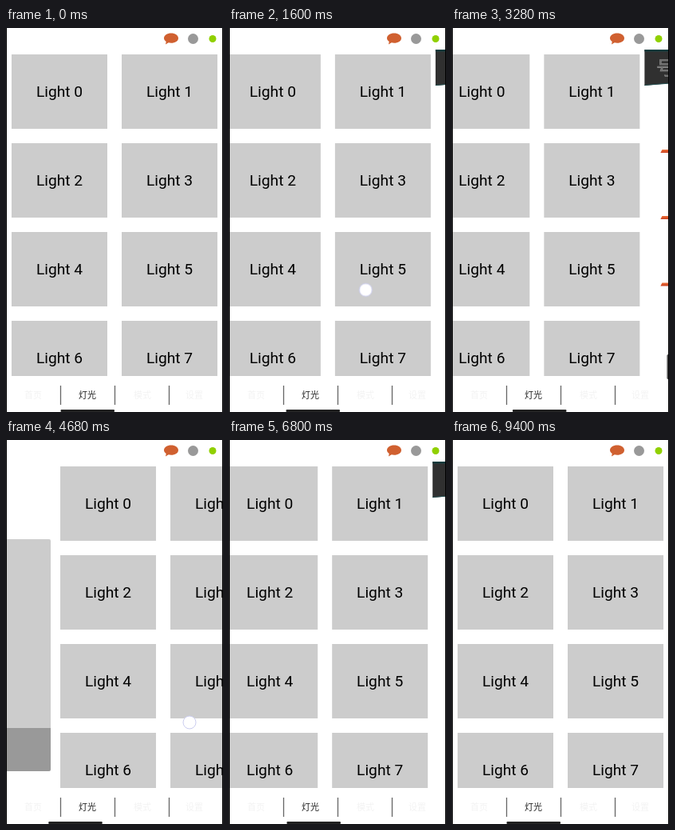
An HTML page for the animation above (9920 ms loop, 272 by 480 pixels).

```html
<!DOCTYPE html>
<html lang="zh-CN">
<head>
<meta charset="utf-8">
<title>灯光</title>
<style>
@property --x { syntax: "<number>"; inherits: true; initial-value: 0; }
@property --base { syntax: "<number>"; inherits: true; initial-value: 181; }
@property --y { syntax: "<number>"; inherits: true; initial-value: 324; }

html, body { margin: 0; width: 100%; height: 100%; overflow: hidden; background: #fff; }
svg {
  display: block; width: 272px; height: 480px;
  animation: drag 9920ms infinite, hand 9920ms linear infinite;
}
#pages { transform: translateX(calc(var(--x) * 1px)); }
#bar { transform: translateX(calc(var(--x) * -.25px)); }
#touch {
  fill: #fff; stroke: #c9cbee; stroke-width: 1;
  transform: translate(calc((var(--base) + var(--x)) * 1px), calc(var(--y) * 1px));
  animation: press 9920ms step-end infinite;
}
text { text-anchor: middle; }
.tile text { font: 19.2px Roboto, sans-serif; }
.tile rect { fill: #ccc; }
.tabs text { font: 11px "Noto Sans CJK SC", "Noto Sans CJK", sans-serif; fill: #f3f3f3; }
.tabs .on { fill: #222; }
.hint {
  font: 23px "Noto Sans CJK SC", "Noto Sans CJK", sans-serif;
  text-anchor: start; fill: #666; stroke: #999; stroke-width: .6;
}
.key { fill: none; stroke: #68759a; stroke-width: 6.5; }
.key.face { stroke: #509b9b; stroke-width: 4; }

/* page offset */
@keyframes drag {
  0%, .403% { --x: 0; animation-timing-function: ease-in-out; }
  8.871% { --x: 61; animation-timing-function: ease-in-out; }
  23.79% { --x: -92; animation-timing-function: ease-in-out; }
  32.66% { --x: -34; animation-timing-function: ease-out; }
  37.903%, 41.935% { --x: 0; animation-timing-function: ease-in-out; }
  47.177% { --x: 61; animation-timing-function: ease-out; }
  50% { --x: 66; animation-timing-function: ease-in; }
  60.081% { --x: 1; animation-timing-function: ease-out; }
  64.919% { --x: -60; animation-timing-function: ease-in-out; }
  70.565%, 75.806% { --x: 0; animation-timing-function: ease-in; }
  79.435% { --x: 27; animation-timing-function: ease-out; }
  81.855% { --x: 56; animation-timing-function: ease-in-out; }
  87.903% { --x: -60; animation-timing-function: ease-in-out; }
  94.758%, 100% { --x: 0; }
}
/* grab point */
@keyframes hand {
  0%, 8.871% { --base: 181; --y: 324; }
  23.79%, 33% { --base: 186; --y: 331; }
  42%, 47.177% { --base: 169; --y: 353; }
  60.081%, 66% { --base: 163; --y: 346; }
  75.8%, 90% { --base: 201; --y: 356; }
  100% { --base: 181; --y: 324; }
}
@keyframes press {
  0%, 32.7%, 65.7%, 89.5%, 100% { opacity: 0; }
  .8%, 42.3%, 76.2% { opacity: 1; }
}
</style>
</head>
<body>
<svg viewBox="0 0 272 480">
  <defs>
    <clipPath id="list"><rect y="27" width="272" height="408"/></clipPath>
    <linearGradient id="rule" x2="0" y2="1">
      <stop stop-color="#ee7038"/><stop offset="1" stop-color="#c9401f"/>
    </linearGradient>
    <path id="line" d="M22 152H86l2 4H20z" fill="url(#rule)"/>
    <path id="digits" d="M49 107l7-5v33M49 135h14M57 184L50 210H65M59 197V223M48 269H62L54 306"/>
    <path id="star" d="M55 361v16M48 365l14 8M62 365l-14 8"/>
  </defs>

  <g id="pages">
    <path d="M-267 124H-7q2 0 2 2V360H-267z" fill="#ccc"/>
    <path d="M-267 360H-5V412q0 2-2 2H-267z" fill="#999"/>

    <g id="tiles" clip-path="url(#list)"></g>

    <g transform="translate(271)">
      <path d="M0 27H272V72Q136 58 0 72z" fill="#303030"/>
      <path d="M0 27H272V29.5H0z" fill="#173b3d"/>
      <path d="M0 71.5Q136 57.5 272 71.5" fill="none" stroke="#234e50"/>
      <text class="hint" x="15" y="58">号码或地址</text>
      <use href="#digits" class="key"/>
      <use href="#digits" class="key face"/>
      <use href="#star" class="key" style="stroke-width:4.5"/>
      <use href="#star" class="key face" style="stroke-width:2.5"/>
      <circle cx="55" cy="369" r="1.8" fill="#fff"/>
      <use href="#line"/>
      <use href="#line" y="83"/>
      <use href="#line" y="166.5"/>
      <rect x="28" y="408" width="36.5" height="31" rx="1.5" fill="#555"/>
      <g fill="none" stroke="#ddd" stroke-width="1.3">
        <circle cx="46" cy="423.5" r="7.3"/>
        <path d="M46 418.5v5.5l4 2"/>
      </g>
    </g>
  </g>

  <path d="M207 6.5c5 0 9 2.6 9 6.2s-4 6-9 6c-1.200 0-2.300-.1-3.300-.4L200 20.500l.7-3.600c-1.700-1.100-2.700-2.600-2.700-4.200 0-3.600 4-6.200 9-6.200z" fill="#d06030"/>
  <circle cx="234.500" cy="13.500" r="6.500" fill="#999"/>
  <circle cx="259" cy="13.500" r="4.500" fill="#90d000"/>

  <g class="tabs">
    <path d="M68.500 447v24M136.500 447v24M204.500 447v24" stroke="#666" stroke-width="1.300"/>
    <text x="34" y="463">首页</text>
    <text x="102" y="463" class="on">灯光</text>
    <text x="171" y="463">模式</text>
    <text x="236" y="463">设置</text>
  </g>
  <rect id="bar" x="68.500" y="477" width="67.500" height="3" rx="1" fill="#222"/>
  <circle id="touch" r="8"/>
  <path d="M.5 0V480M271.500 0V480" stroke="#000"/>
</svg>
<script>
const tile = (_, i) => {
  const x = 7 + i % 2 * 138, y = 33 + (i >> 1) * 111;
  return `<g class="tile"><rect x="${x}" y="${y}" width="120" height="93"/>
    <text x="${x + 60}" y="${y + 53}">Light ${i}</text></g>`;
};
document.getElementById("tiles").innerHTML = Array.from({ length: 8 }, tile).join("");
</script>
</body>
</html>
```
